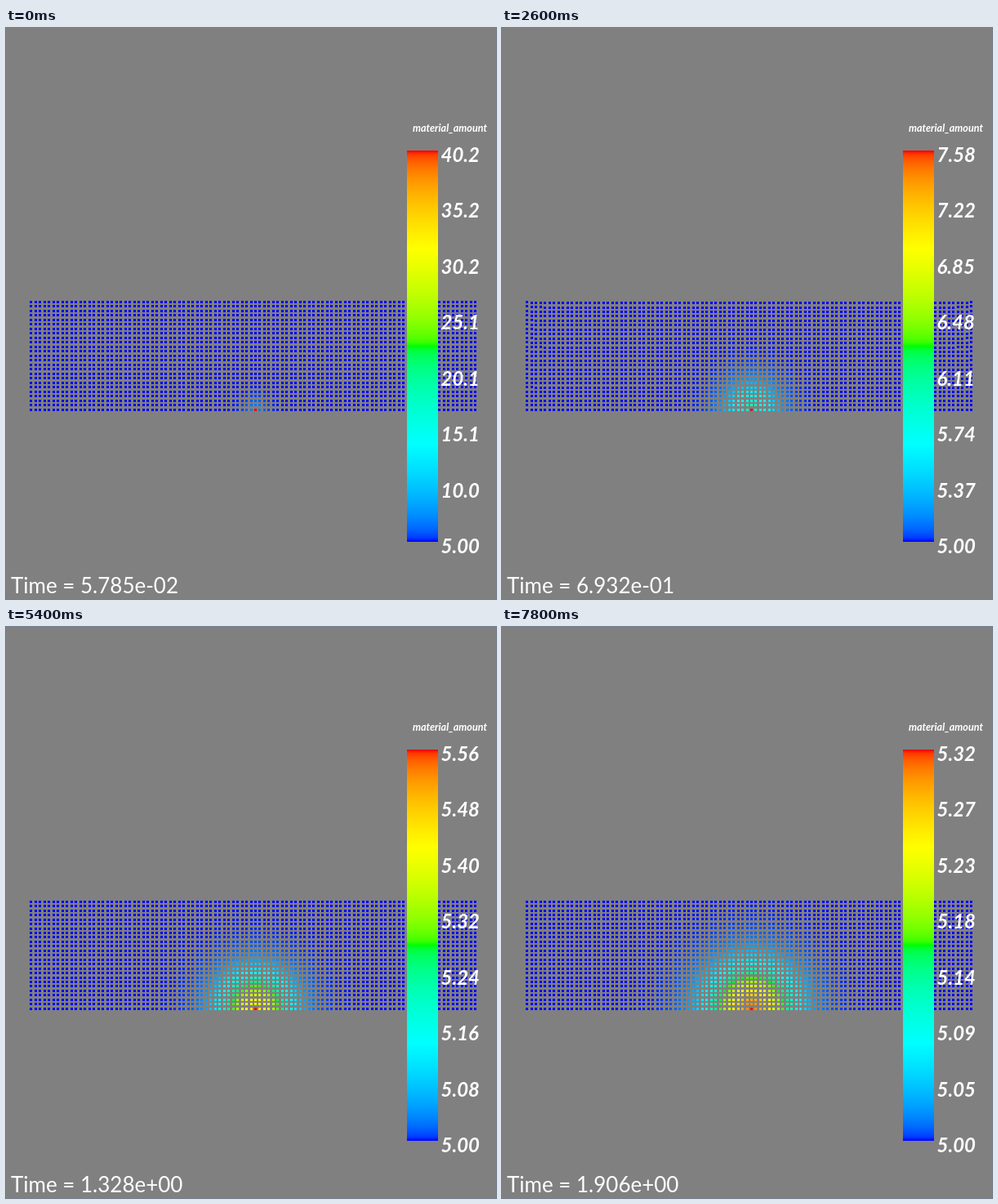
Animation, 600 px wide and 699 px high, one loop 8 s. Source, as an HTML page:

```html
<!DOCTYPE html>
<html lang="en">
<head>
<meta charset="utf-8">
<title>Diffusion in a particle block</title>
<style>
html, body { margin: 0; width: 100%; height: 100%; overflow: hidden; background: #808080; }
svg { display: block; width: 600px; height: 699px; font-family: Lato, "Open Sans", sans-serif; fill: #fff; }
.legend { font-weight: 700; font-style: italic; }
</style>
</head>
<body>
<svg id="stage" viewBox="0 0 600 699">
  <defs><linearGradient id="ramp" x1="0" y1="1" x2="0" y2="0"></linearGradient></defs>
  <g id="dots" shape-rendering="crispEdges"></g>
  <rect x="491" y="150" width="38" height="479" fill="url(#ramp)"/>
  <g id="legend" class="legend" font-size="24">
    <text x="543.5" y="127" font-size="12.6" text-anchor="middle">material_amount</text>
  </g>
  <text id="clock" x="6" y="691.5" font-size="26"></text>
</svg>
<script>
const NS = 'http://www.w3.org/2000/svg';
const $ = id => document.getElementById(id);
const COLS = 100, ROWS = 25, PITCH = 5.495, LEFT = 30.75, TOP = 335.5;
const SRC_COL = 50, SRC_ROW = ROWS - 1;
const STEP = 200, STEPS = 40, FIRST = 1, LAST = 33;
const BASE = 5, TICKS = 7;

// output number, time, peak excess, cloud height, sag of the top, sag of the sides
const KEYS = [
  [1, 0.05785, 35.22, 0.06, 0, 0],
  [6, 0.3466, 9.98, 0.18, 0.7, 0],
  [12, 0.6932, 2.5845, 0.36, 1.2, 0],
  [17, 0.982, 1.082, 0.66, 1, 0.2],
  [23, 1.328, 0.56, 0.8, 0.9, 0.9],
  [26, 1.501, 0.458, 0.86, 0.8, 0.8],
  [33, 1.906, 0.318, 0.94, 0.7, 0.7]
];

function add(parent, tag, attrs) {
  const el = document.createElementNS(NS, tag);
  for (const name in attrs) el.setAttribute(name, attrs[name]);
  return parent.appendChild(el);
}

// Rainbow blended in linear light: blue, cyan, green, yellow, red
const HUES = [[0, 0, 1], [0, 1, 1], [0, 1, 0], [1, 1, 0], [1, 0, 0]];
function color(v) {
  const p = Math.min(1, Math.max(0, v)) * 4;
  const i = Math.min(3, Math.floor(p)), f = p - i;
  const rgb = HUES[i].map((c, n) =>
    Math.round(255 * Math.pow(c + (HUES[i + 1][n] - c) * f, 1 / 2.2)));
  return `rgb(${rgb})`;
}

function slope(i, col, fn) {
  const a = KEYS[Math.max(0, i - 1)], b = KEYS[Math.min(KEYS.length - 1, i + 1)];
  return (fn(b[col]) - fn(a[col])) / (b[0] - a[0]);
}

function sample(k) {
  let i = 0;
  while (i < KEYS.length - 2 && k >= KEYS[i + 1][0]) i++;
  const a = KEYS[i], b = KEYS[i + 1], w = b[0] - a[0], u = (k - a[0]) / w;
  const mix = col => a[col] + (b[col] - a[col]) * u;
  const la = Math.log(a[2]), lb = Math.log(b[2]);
  const ma = slope(i, 2, Math.log) * w, mb = slope(i + 1, 2, Math.log) * w;
  const u2 = u * u, u3 = u2 * u;
  const log = la * (2 * u3 - 3 * u2 + 1) + lb * (3 * u2 - 2 * u3)
    + ma * (u3 - 2 * u2 + u) + mb * (u3 - u2);
  return { time: mix(1), excess: Math.exp(log), cloud: mix(3), sag: mix(4), side: mix(5) };
}

for (let i = 0; i <= 96; i++) add($('ramp'), 'stop', { offset: i / 96, 'stop-color': color(i / 96) });

const labels = [];
for (let i = 0; i <= TICKS; i++) {
  labels.push(add($('legend'), 'text', { x: 532.5, y: 643 - i * 68.43 }));
}

const dots = [];
for (let row = 0; row < ROWS; row++) {
  for (let col = 0; col < COLS; col++) {
    const x = Math.round(LEFT + col * PITCH - 1.5);
    const el = add($('dots'), 'rect', { x, width: 3, height: 3 });
    dots.push({ el, row, col });
  }
}

function draw(step) {
  const k = Math.round(FIRST + step * (LAST - FIRST) / (STEPS - 1));
  const s = sample(k);
  const spread = 100 + 1250 * s.time;
  for (const { el, row, col } of dots) {
    const dx = (col - SRC_COL) * PITCH, dy = (row - SRC_ROW) * PITCH;
    const source = !dx && !dy;
    const v = source ? 1 : s.cloud * Math.exp(-(dx * dx + dy * dy) / spread);
    const edge = Math.exp(-Math.min(col, COLS - 1 - col) / 1.2);
    const sag = (s.sag + (s.side - s.sag) * edge) * (1 - row / SRC_ROW);
    el.setAttribute('y', Math.round(TOP + row * PITCH - 1.6 + sag));
    el.setAttribute('fill', color(v));
  }
  labels.forEach((el, i) => { el.textContent = (BASE + s.excess * i / TICKS).toPrecision(3); });
  $('clock').textContent = 'Time = ' + s.time.toExponential(3).replace(/(\d)$/, '0$1');
}

const start = performance.now();
let shown = -1;
function tick() {
  const step = Math.floor((performance.now() - start) / STEP) % STEPS;
  if (step !== shown) draw(shown = step);
  requestAnimationFrame(tick);
}
tick();
</script>
</body>
</html>
```
